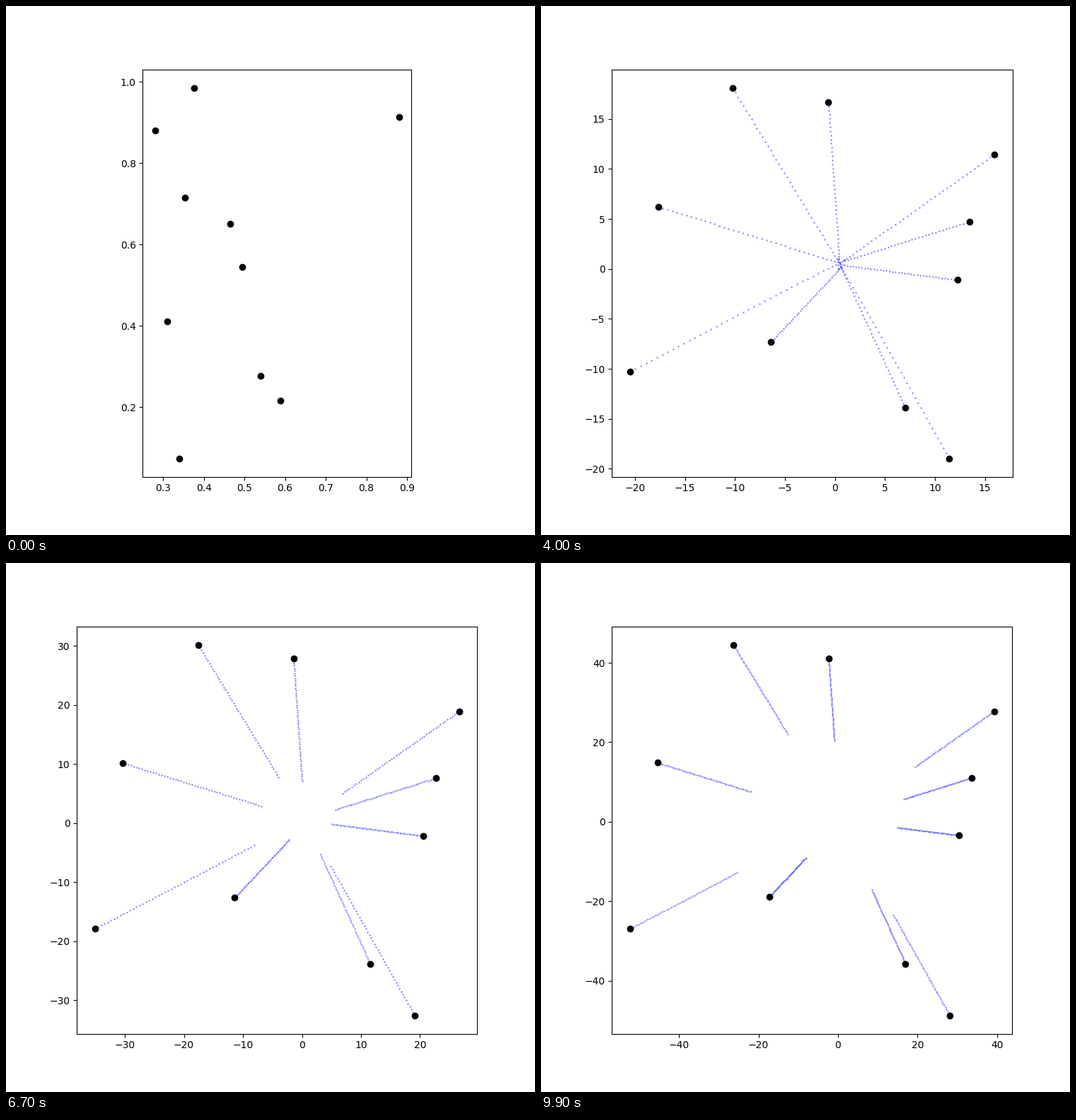
Write a matplotlib script that moves like this. It is 748x748 px and loops after 10000 ms.

```python
import matplotlib.pyplot as plt
import numpy as np
from matplotlib.animation import FuncAnimation

FRAMES, INTERVAL = 100, 100
TRAIL = 50
SETTLE = 1.85  # frames needed to reach cruising speed

# Resting position, then where the straight flight passes at frames 25 and 99
PARTICLES = np.array([
    [0.588, 0.216, 7.16, -11.38, 28.13, -48.70],
    [0.540, 0.276, 4.48, -8.29, 16.98, -35.73],
    [0.310, 0.410, -12.41, -6.04, -52.30, -26.92],
    [0.340, 0.074, -3.64, -4.38, -17.30, -18.90],
    [0.494, 0.545, 7.61, -0.51, 30.43, -3.43],
    [0.465, 0.651, 8.38, 3.14, 33.63, 11.07],
    [0.881, 0.914, 10.00, 7.25, 39.29, 27.83],
    [0.377, 0.985, -0.22, 10.47, -2.35, 41.14],
    [0.280, 0.881, -6.16, 11.39, -26.30, 44.48],
    [0.353, 0.716, -10.62, 4.04, -45.44, 14.86],
])
start, early, late = PARTICLES[:, :2], PARTICLES[:, 2:4], PARTICLES[:, 4:]
velocity = (late - early) / 74
origin = early - 25 * velocity

# The particles push off from rest and approach a constant velocity
steps = np.arange(FRAMES)[:, None, None]
path = origin + velocity * steps + (start - origin) * np.exp(-steps / SETTLE)

fig, ax = plt.subplots(figsize=(7.48, 7.48), dpi=100)


def update(n):
    ax.clear()
    ax.set_aspect("equal")
    trail = path[max(0, n - TRAIL):n + 1]
    for k in range(len(PARTICLES)):
        ax.plot(trail[:, k, 0], trail[:, k, 1], "bo", ms=1, alpha=0.3)
    ax.plot(path[n, :, 0], path[n, :, 1], "ko", ms=6, zorder=3)
    return ax.lines


anim = FuncAnimation(fig, update, frames=FRAMES, interval=INTERVAL,
                     init_func=lambda: update(0), repeat=True, repeat_delay=0)
plt.show()
```
